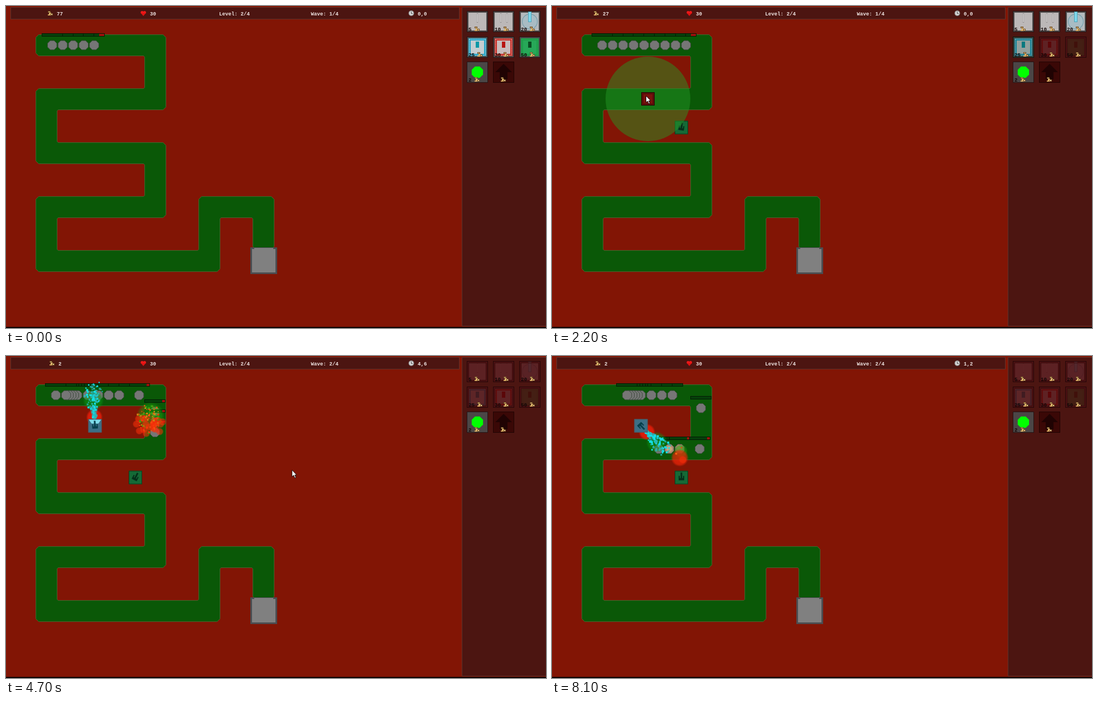
Recreate the animation shown at these times as an HTML page with a canvas. Size 968 px wide and 579 px high, loop 8.2 s.

```html
<!DOCTYPE html>
<html lang="en">
<head>
<meta charset="utf-8">
<title>Tower defence</title>
<style>
html, body { margin: 0; width: 100%; height: 100%; overflow: hidden; background: #821505; }
canvas { display: block; }
</style>
</head>
<body>
<canvas id="stage" width="968" height="579"></canvas>
<script>
const g = document.getElementById('stage').getContext('2d');
const LOOP = 8.2, TAU = Math.PI * 2;
const CANNON = [232, 218.5], FROST = [159.5, 125.5];
const FROST_ON = 2.72, WAVE_END = 4.3;

// ---------- helpers ----------
const rnd = n => { const v = Math.sin(n * 12.9898 + 4.1) * 43758.5453; return v - Math.floor(v); };

function rect(x, y, w, h, fill, line) {
  g.fillStyle = fill;
  g.fillRect(x, y, w, h);
  if (line) { g.strokeStyle = line; g.lineWidth = 1; g.strokeRect(x + .5, y + .5, w - 1, h - 1); }
}
const box = (x, y, r, fill, line) => rect(x - r, y - r, r * 2, r * 2, fill, line);

function disc(x, y, r, fill) {
  g.fillStyle = fill;
  g.beginPath();
  g.arc(x, y, r, 0, TAU);
  g.fill();
}
function glow(x, y, r, rgb, a) {
  const s = g.createRadialGradient(x, y, 0, x, y, r);
  s.addColorStop(0, `rgba(${rgb},${a})`);
  s.addColorStop(.75, `rgba(${rgb},${a * .85})`);
  s.addColorStop(1, `rgba(${rgb},0)`);
  disc(x, y, r, s);
}
function poly(points, fill, line) {
  g.beginPath();
  points.forEach(([x, y]) => g.lineTo(x, y));
  g.closePath();
  g.fillStyle = fill;
  g.fill();
  if (line) { g.strokeStyle = line; g.lineWidth = 1; g.stroke(); }
}
function octagon(x, y, r, fill, line) {
  const pts = [];
  for (let i = 0; i < 8; i++) {
    const a = (i + .5) * TAU / 8;
    pts.push([x + r * Math.cos(a), y + r * Math.sin(a)]);
  }
  poly(pts, fill, line);
}
function text(s, x, y, fill = '#eee4e2') {
  g.font = 'bold 9.2px "Liberation Mono", monospace';
  g.fillStyle = fill;
  g.fillText(s, x, y);
}
// linear interpolation through [time, ...values]
function track(keys, t) {
  if (t <= keys[0][0]) return keys[0].slice(1);
  for (let i = 1; i < keys.length; i++) {
    const a = keys[i - 1], b = keys[i];
    if (t <= b[0]) {
      const k = (t - a[0]) / (b[0] - a[0]);
      return a.slice(1).map((v, j) => v + (b[j + 1] - v) * k);
    }
  }
  return keys[keys.length - 1].slice(1);
}

// ---------- road ----------
const outline = [[54,52],[287,52],[287,187],[92,187],[92,246],[287,246],[287,381],[92,381],[92,440],
  [346,440],[346,343],[481,343],[481,438],[443,438],[443,381],[384,381],[384,478],[54,478],[54,343],
  [249,343],[249,284],[54,284],[54,149],[249,149],[249,90],[54,90]];
const road = new Path2D();
outline.forEach((p, i) => {
  const n = outline.length, a = outline[(i + n - 1) % n], b = outline[(i + 1) % n];
  const turn = (p[0] - a[0]) * (b[1] - p[1]) - (p[1] - a[1]) * (b[0] - p[0]);
  const r = turn > 0 ? 5 : 2;
  const toward = q => {
    const d = Math.hypot(q[0] - p[0], q[1] - p[1]);
    return [p[0] + (q[0] - p[0]) * r / d - .4, p[1] + (q[1] - p[1]) * r / d - .4];
  };
  road.lineTo(...toward(a));
  road.lineTo(...toward(b));
});
road.closePath();

function drawField() {
  rect(0, 0, 968, 579, '#821505');
  g.fillStyle = '#0a5807';
  g.fill(road);
  g.strokeStyle = '#44682f';
  g.lineWidth = 1;
  g.stroke(road);
  rect(438, 434, 48, 48, '#4b4d51');
  rect(441, 437, 42, 42, '#808080');
  rect(445, 435, 34, 3, '#808080');
}

// ---------- enemies ----------
function place(s) {
  if (s < 195) return [72 + s, 70.5];
  if (s < 291.5) return [267, s - 124.5];
  return [558.5 - s, 167];
}
function travel(i, t) {
  let s = 86 - 18.8 * i;
  const dt = .02;
  for (let k = 0; k < Math.round(t / dt); k++) {
    const now = k * dt;
    const slow = now >= FROST_ON && s > 35 && s < 144 || now >= 7.32 && s > 308;
    s += (slow ? 9.3 : 37.4) * dt;
  }
  return s;
}
function drawEnemies(t, fire) {
  const list = [];
  for (let i = 0; i < 14; i++) {
    const s = travel(i, t);
    if (s >= 0) list.push([i, ...place(s)]);
  }
  list.forEach(([, x, y]) => {
    const hot = fire[2] > 0 && Math.hypot(x - fire[0], y - fire[1] + 8) < 28;
    octagon(x, y, 9, hot ? '#a98a70' : '#767676', '#3c4a3c');
    if (hot) glow(x, y, 6, '240,200,140', .5);
  });
  list.forEach(([i, x, y]) => {
    const left = Math.round(x - 19), top = Math.round(y - 22);
    const loss = i === 0 ? (t < 2.8 ? 9 : t < 4.5 ? 12 : 16) : i < 4 && t > 3.9 ? 5 : 0;
    rect(left, top, 38, 6, '#06400a', '#031a05');
    if (loss) rect(left + 37 - loss, top + 1, loss, 4, '#a00f0c');
  });
}

// ---------- towers ----------
function barrel(x, y, angle, fill) {
  g.save();
  g.translate(x, y);
  g.rotate(angle);
  rect(-5, 1, 10, 4, fill);
  rect(-5, -3, 2, 5, fill);
  rect(3, -3, 2, 5, fill);
  rect(-1.5, -9, 3, 11, fill);
  g.restore();
}
function drawTowers(t, aim, fire) {
  if (t >= 1.5) {
    const [x, y] = CANNON;
    box(x, y, 12, '#156a36', '#0b3c1c');
    const angle = fire[2] > 0 ? Math.atan2(fire[0] + 12 - x, y - 30 - fire[1]) : .1;
    barrel(x, y, t < 6 ? Math.max(.15, angle) : 0, '#06301a');
  }
  if (t >= FROST_ON) {
    const [x, y] = FROST;
    box(x, y, 12, '#3c6f86', '#4b5a62');
    if (t < 7.32) poly([[x - 11, y - 11], [x + 11, y - 11], [x + 6, y - 4], [x - 6, y - 4]], '#7fdcea');
    barrel(x, y, Math.atan2(aim[0] - x, y - aim[1]), '#063f4c');
  }
}

// ---------- particles ----------
function drawFrost(t, aim) {
  const [x, y] = FROST;
  const dx = aim[0] - x, dy = aim[1] - y, len = Math.hypot(dx, dy), ux = dx / len, uy = dy / len;
  const at = (d, side) => [x + ux * d - uy * side, y + uy * d + ux * side];
  glow(...at(len * .66, 0), 19, '10,150,20', .6);
  glow(...at(15.5, 0), 15, '240,30,10', .9);
  poly([at(11, -2), at(11, 2), at(34, 8), at(34, -8)], 'rgba(40,170,180,.5)');
  for (let k = 0; k < 115; k++) {
    const u = t * 2.2 + rnd(k), p = u % 1, seed = k * 7 + Math.floor(u) * 131;
    const spread = (rnd(seed) + rnd(seed + 1) - 1) * (2 + 23 * p);
    const reach = p * (.85 + .3 * rnd(seed + 2));
    const [px, py] = at(12 + (len - 8) * reach, spread);
    const r = 1 + rnd(seed + 3) * 1.1;
    box(px, py, r, rnd(seed + 4) < .45 ? '#12dfe6' : 'rgba(40,185,190,.75)');
  }
}
function drawFire(t, [x, y, power, spread]) {
  if (power <= 0) return;
  glow(x + 2, y - 8, 12 + spread * .6 * power, '30,150,10', .65);
  glow(x, y + 4, 16, '240,36,8', .8 - spread * .018 * power);
  const count = Math.round(130 * power);
  for (let k = 0; k < count; k++) {
    const u = t * 2.5 + rnd(k + 300), p = u % 1, seed = k * 11 + Math.floor(u) * 97;
    const a = rnd(seed) * TAU, d = Math.sqrt(rnd(seed + 1)) * spread;
    const px = x + Math.cos(a) * d, py = y + Math.sin(a) * d;
    if (k % 6 === 0) {
      glow(px, y + 8 + (py - y) * .65, 7, '245,46,8', .65);
    } else {
      const r = .8 + rnd(seed + 2);
      box(px * .85 + x * .15, py - 3, r,
        ['#ff5a12', '#f23c0a', '#d08a14', '#38a512'][Math.floor(rnd(seed + 3) * 4)]);
    }
  }
}
const firePath = [[2.9, 216, 90, .4, 24], [3.3, 222, 86, .8, 28], [3.8, 232, 79, .75, 31], [4.4, 250, 92, .8, 28],
  [5, 264, 140, .9, 24], [5.7, 259, 177, 1, 22], [6.9, 228, 183, 1, 22], [7.5, 222, 184, .8, 20], [8.1, 229, 179, .02, 12]];
const frostAim = [[7.2, 155, 56], [7.35, 200, 168], [8.1, 202, 170]];

// ---------- panels ----------
function coins(x, y) {
  rect(x - 4, y - 4, 5, 3, '#e8c88c', '#6d4a22');
  rect(x - 2, y - 1, 4, 3, '#dcb56c');
  rect(x - 4, y + 2, 5, 2, '#cfa45c');
  rect(x + 1, y, 4, 4, '#ead09a', '#6d4a22');
}
function drawBar(t, money) {
  rect(8, 2, 805, 22, '#4c1511', '#5d322b');
  const shift = money < 10 ? 3 : 0;
  coins(79 + shift, 13);
  text(money, 91 + shift, 16.5);
  disc(244, 11.5, 2.6, '#f01818');
  disc(248.4, 11.5, 2.6, '#f01818');
  poly([[241.6, 12.5], [250.8, 12.5], [246.2, 18]], '#e01212');
  text('30', 258, 16.5);
  text('Level: 2/4', 382, 16.5);
  text(`Wave: ${t < WAVE_END ? 1 : 2}/4`, 546.5, 16.5);
  disc(726.5, 13, 5, '#8d8d8d');
  disc(726.5, 13, 3.8, '#d4d4d4');
  rect(726, 10, 1, 4, '#555');
  rect(726, 13, 3, 1, '#555');
  const left = t < WAVE_END ? 0 : WAVE_END + 5 - t;
  text(left.toFixed(1).replace('.', ','), 738, 16.5);
}

const gun = (x, y) => rect(x - 1.5, y - 15, 3, 17, '#f4f2f2', '#8e8a8a');
const items = [
  [5, '#bcb8b8', gun],
  [10, '#bcb8b8', (x, y) => { gun(x - 5, y); gun(x + 6, y); }],
  [20, '#b4b9bd', (x, y) => {
    disc(x, y, 14, '#6d9aa8');
    disc(x, y, 13, '#a9bcc4');
    rect(x - 3, y - 18, 6, 19, '#7fd8ec', '#4fa3b8');
  }],
  [25, '#1fa5c8', (x, y) => framed(x, y, '#c4cdd0', '#0c98a6')],
  [30, '#cc2a22', (x, y) => framed(x, y, '#c9bcbc', '#b81410')],
  [50, '#1f9c4a', (x, y) => framed(x, y, '#27a858', '#0a4d22')],
  [2, '#4b4646', (x, y) => octagon(x, y, 11, '#00ff00')],
  [0, '#3a0806', (x, y) => poly([[x, y - 15], [x + 15, y], [x + 7, y], [x + 7, y + 13], [x - 7, y + 13],
    [x - 7, y], [x - 15, y]], '#200303')]
];
function framed(x, y, fill, tube) {
  g.setLineDash([2, 1]);
  g.strokeStyle = fill;
  g.lineWidth = 1;
  g.strokeRect(x - 14.5, y - 14.5, 29, 29);
  g.setLineDash([]);
  box(x, y, 12, fill);
  rect(x - 3, y - 10, 6, 11, tube);
}
function drawShop(t, money, picked) {
  rect(817, 2, 152, 574, '#4c1511', '#5d322b');
  items.forEach(([price, fill, icon], i) => {
    const x = 845 + i % 3 * 47, y = [28, 74, 119][Math.floor(i / 3)];
    box(x, y, 19, price ? '#4e4a4a' : '#3a0806', price ? '#241515' : '#1f0403');
    box(x, y, 16, fill);
    if (price === 2) box(x, y, 18, t > 6.7 && t < 7.4 ? '#3a4434' : fill);
    icon(x, y);
    if (price > money) {
      box(x, y, 19, 'rgba(74,5,8,.84)', '#240707');
      g.strokeStyle = '#3a0c0c';
      g.strokeRect(x - 15.5, y - 15.5, 31, 31);
    } else if (price && price === picked) {
      box(x, y, 19, 'rgba(0,30,10,.25)', '#0a1a10');
    }
    if (price) text(price, x - 16, y + 16.5, '#140808');
    coins(x + (price > 9 ? 4 : -1), y + 13);
  });
}

// ---------- pointer ----------
const pointerPath = [[.1, 968, 50], [.4, 938, 72], [.9, 280, 214], [1, 230, 222], [1.1, 232, 222], [1.5, 232, 214.5],
  [1.8, 845, 72], [1.9, 845, 72], [2.1, 172, 163], [2.2, 168, 161], [2.5, 159, 121.5], [2.8, 159, 121.5],
  [3.4, 500, 200], [3.8, 516, 204], [5.7, 508, 205], [6.2, 560, 200], [6.7, 838, 130], [6.9, 840, 133],
  [7.3, 844, 130], [7.6, 968, 90]];

function drawPointer(t) {
  if (t < .2 || t >= 7.6) return;
  const [x, y] = track(pointerPath, t);
  const shape = [[0, 0], [0, 12], [3, 9.5], [5, 14.5], [7, 13.5], [5, 9], [8.5, 9]];
  poly(shape.map(([a, b]) => [x + a + .5, y + b + .5]), '#fff', '#1a0a0a');
}
function drawGhost(t, picked) {
  if (!picked) return;
  let [x, y] = track(pointerPath, t - .1);
  y += 4;
  if (x > 817) return;
  disc(x, y, picked === 50 ? 152 : 76, 'rgba(37,150,36,.48)');
  const blocked = g.isPointInPath(road, x, y);
  const [fill, line] = blocked ? ['#5c0d0a', '#210404'] : picked === 50 ? ['#11672f', '#06301a'] : ['#3c6f86', '#12303a'];
  box(x, y, 12, fill, line);
  box(x, y, 8, blocked ? '#7a120c' : fill);
}

// ---------- main ----------
function draw(t) {
  const money = t < 1.5 ? 77 : t < FROST_ON ? 27 : 2;
  const picked = t >= .4 && t < 1.5 ? 50 : t >= 1.9 && t < FROST_ON ? 25 : 0;
  const fire = t < 2.9 ? [0, 0, 0, 0] : track(firePath, t);
  const aim = track(frostAim, t);
  drawField();
  drawEnemies(t, fire);
  if (t >= FROST_ON) drawFrost(t, aim);
  drawFire(t, fire);
  drawTowers(t, aim, fire);
  drawGhost(t, picked);
  drawBar(t, money);
  drawShop(t, money, picked);
  rect(0, 577, 968, 2, '#0c0202');
  drawPointer(t);
}
const start = performance.now();
function tick() {
  const t = (performance.now() - start) / 1000 % LOOP;
  draw(Math.floor(t * 10 + .001) / 10);
  requestAnimationFrame(tick);
}
tick();
</script>
</body>
</html>
```
